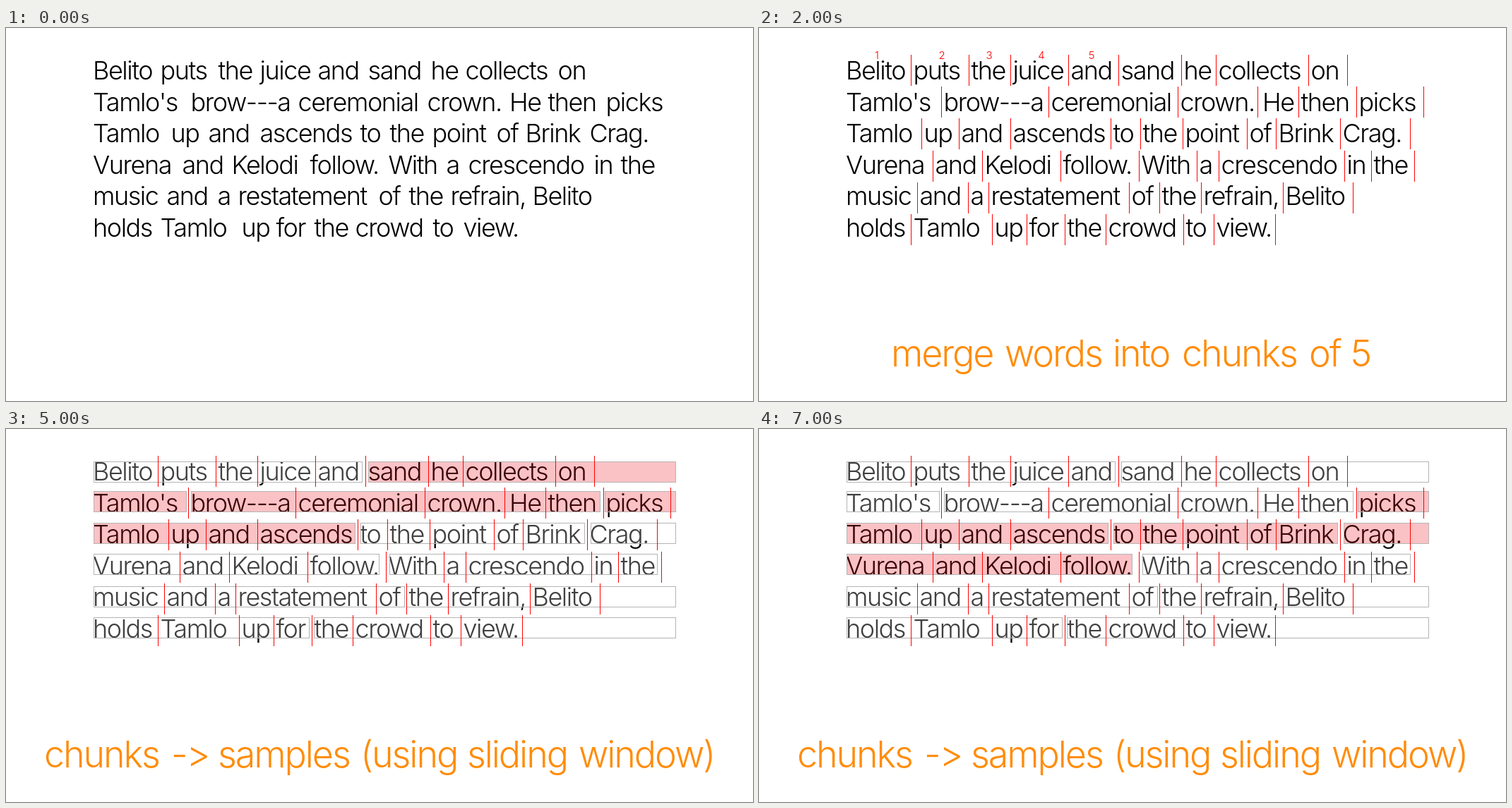
Animation, 1058 px wide and 529 px high, one loop 8 s. Source, as an HTML page:

```html
<!DOCTYPE html>
<html lang="en">
<head>
<meta charset="utf-8">
<title>Text chunks and sliding window</title>
<style>
  html, body { margin: 0; width: 100%; height: 100%; overflow: hidden; background: #fff; }
  svg { display: block; width: 1058px; height: 529px; }
  text {
    font: 300 36px Inter, "Liberation Sans", Arial, sans-serif;
    font-variation-settings: "opsz" 14;
    font-feature-settings: "calt" 0;
    font-variant-ligatures: none;
    letter-spacing: -.04em;
    white-space: pre;
  }
  .caption text { font-size: 52px; fill: #ff8c0a; }
  .numbers text { font-size: 15px; fill: #f00; text-anchor: middle; letter-spacing: 0; }
  .bars { fill: #f00; }
  .boxes rect { fill: rgba(255, 255, 255, .25); stroke: #b4b4b4; }
  .boxes rect.on { fill: rgba(235, 15, 27, .25); }
</style>
</head>
<body>
<svg id="stage" viewBox="0 0 1058 529"></svg>
<script>
const LOOP = 8000, LEFT = 124;

// Each line: its words and the separator after each word.
const lines = [
  ["Belito puts the juice and sand he collects on", [215, 297, 356, 438, 509, 598, 647, 778, 833]],
  ["Tamlo's brow---a ceremonial crown. He then picks", [258, 410, 593, 706, 764, 846, 941]],
  ["Tamlo up and ascends to the point of Brink Crag.", [230, 283, 356, 498, 540, 600, 691, 732, 823, 922]],
  ["Vurena and Kelodi follow. With a crescendo in the", [246, 316, 427, 538, 620, 651, 829, 867, 928]],
  ["music and a restatement of the refrain, Belito", [224, 296, 325, 524, 567, 626, 742, 841]],
  ["holds Tamlo up for the crowd to view.", [215, 330, 379, 433, 491, 601, 644, 731]]
];

// Each row: top, then [left, right, chunk] of its boxes.
const rows = [
  [46, [124, 504, 0], [513, 948, 1]],
  [88, [124, 255, 1], [262, 841, 2], [848, 948, 3]],
  [133, [124, 494, 3], [502, 819, 4], [828, 948, 5]],
  [177, [124, 528, 5], [543, 922, 6]],
  [223, [124, 564, 7], [567, 948, 8]],
  [267, [124, 429, 8], [436, 948, 9]]
];

const captions = [
  ["split the passage into individual words", [86, 195, 283, 496, 596, 828]],
  ["merge words into chunks of 5", [187, 348, 501, 599, 779, 838]],
  ["chunks -> samples (using sliding window)", [54, 234, 300, 502, 653, 811]]
];

const stage = document.getElementById("stage");

function add(parent, tag, attrs, content = "") {
  const node = document.createElementNS("http://www.w3.org/2000/svg", tag);
  for (const key in attrs) node.setAttribute(key, attrs[key]);
  node.textContent = content;
  return parent.appendChild(node);
}

const group = name => add(stage, "g", { class: name });

function addWords(parent, string, xs, y) {
  string.split(" ").forEach((word, i) => add(parent, "text", { x: xs[i], y }, word));
}

const prose = group("prose"), boxes = group("boxes"), bars = group("bars"), numbers = group("numbers");

lines.forEach(([string, stops], row) => {
  const words = string.split(" ");
  const starts = words.map((word, i) => i ? stops[i - 1] + (word === "He" ? 7 : 3.5) : LEFT - 1);
  addWords(prose, string, starts, 73 + 44.5 * row);
  for (const x of stops) add(bars, "rect", { x, y: Math.round(38 + 45.2 * row), width: 1, height: 44 });
});

const chunks = [];
for (const [top, ...spans] of rows) {
  for (const [left, right, chunk] of spans) {
    const node = add(boxes, "rect", { x: left + .5, y: top + .5, width: right - left, height: 29 });
    chunks.push({ node, chunk });
  }
}

[167, 259, 326, 400, 471].forEach((x, i) => add(numbers, "text", { x, y: 44 }, i + 1));

const captionGroups = captions.map(([string, xs]) => {
  const node = group("caption");
  addWords(node, string, xs, 480);
  return node;
});

const show = (node, visible) => node.setAttribute("visibility", visible ? "visible" : "hidden");

function draw(now) {
  const step = Math.floor(now % LOOP / 1000);
  const caption = step < 1 ? -1 : step < 2 ? 0 : step < 4 ? 1 : 2;
  show(bars, step >= 1);
  show(numbers, step === 2 || step === 3);
  show(boxes, step >= 3);
  captionGroups.forEach((node, i) => show(node, i === caption));

  // One chunk is marked first, then a window of three slides along.
  const first = Math.max(0, step - 4), last = step < 4 ? 0 : first + 2;
  for (const { node, chunk } of chunks) {
    node.classList.toggle("on", chunk >= first && chunk <= last);
  }
}

const start = performance.now();
function tick() {
  draw(performance.now() - start);
  requestAnimationFrame(tick);
}
tick();
</script>
</body>
</html>
```
